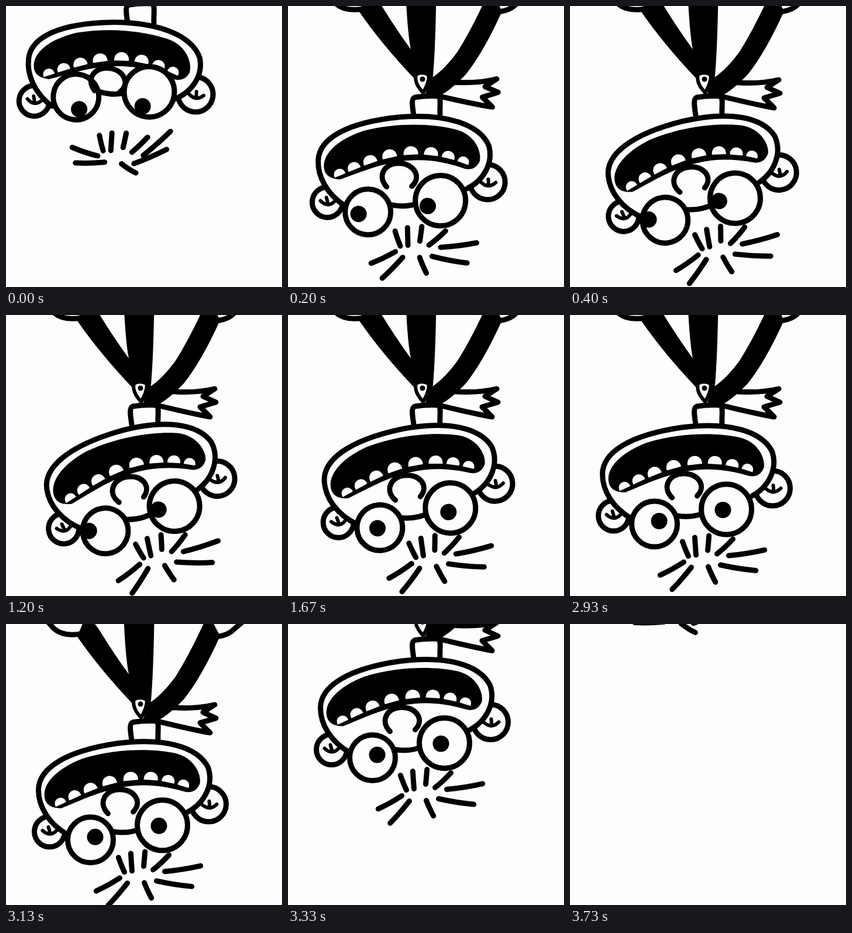
Recreate the animation shown at these times as an HTML page. Size 472 px wide and 480 px high, loop 3.79 s.

```html
<!DOCTYPE html>
<html lang="en">
<head>
<meta charset="utf-8">
<title>Upside-down peek</title>
<style>
html, body { margin: 0; width: 100%; height: 100%; overflow: hidden; background: #fdfdfd; }
svg { display: block; width: 100%; height: 100%; }
.line { fill: none; stroke: #000; stroke-width: 9; stroke-linecap: round; stroke-linejoin: round; }
.skin { fill: #fdfdfd; }
.thin { stroke-width: 6; }
</style>
</head>
<body>
<svg viewBox="0 0 472 480">
  <g id="figure">
    <path class="line skin" d="M64 -24L82 -4Q98 10 128 5L150 -30"/>
    <path class="line skin" d="M340 -30L361 10Q381 7 390 -3L412 -22"/>
    <path id="scarf" class="line skin" d="M246 125C275 132 320 135 357 126L337 139L359 149L332 157L349 174C320 169 295 163 262 155"/>
    <path d="M122 10L138 -30L158 -4Q185 40 210 74Q203 40 200 -60H254Q253 60 248 119L234 150L216 124Q160 65 122 10Z"/>
    <path d="M334 -4L346 -30L366 9Q335 78 304 117Q280 142 262 152L234 154Q238 136 247 122Q268 108 290 78Q312 43 334 -4Z"/>
    <path class="line skin thin" d="M219 117Q230 111 241 118Q241 132 231 148Q215 131 219 117Z"/>
    <circle cx="230" cy="125" r="4.5"/>
    <path class="line skin" d="M215 187C213 173 210 158 217 156Q236 153 256 154C263 155 259 173 260 187"/>
    <g id="head">
      <circle class="line skin" cx="73" cy="343" r="26"/>
      <path class="line thin" d="M61 341Q74 353 85 341M71 335L74 345"/>
      <circle class="line skin" cx="345" cy="296" r="30"/>
      <path class="line thin" d="M334 297Q347 308 359 296M346 291L347 302"/>
      <path class="line skin" d="M104 348C72 330 54 300 54 272C54 235 100 205 190 192C270 182 326 198 344 233C354 262 339 293 310 309"/>
      <path d="M65 287C59 262 85 235 130 218C190 200 250 201 288 209C322 217 333 247 330 261Q323 278 305 275C212 246 152 279 93 303Q69 303 65 287Z"/>
      <path id="lip" fill="none" d="M91 297C150 270 210 236 303 266"/>
      <g id="teeth" class="skin"></g>
      <g id="hair" class="line"></g>
      <g id="glasses">
        <path class="line" d="M182 343Q208 347 228 338"/>
        <circle class="line skin" cx="143" cy="357" r="39"/>
        <circle class="line skin" cx="266" cy="332" r="43"/>
        <circle id="pupilL" cx="143" cy="357" r="14"/>
        <circle id="pupilR" cx="266" cy="332" r="14"/>
      </g>
      <path class="line" d="M173 312C154 293 170 270 193 271C217 270 233 292 216 309"/>
    </g>
  </g>
</svg>
<script>
const LOOP = 3790, STEP = 200 / 3, TEETH = 8;
const el = id => document.getElementById(id);
const move = (id, value) => el(id).setAttribute("transform", value);
const add = parent =>
  el(parent).appendChild(document.createElementNS("http://www.w3.org/2000/svg", "path"));
const clamp = k => Math.min(1, Math.max(0, k));
const part = (t, from, to) => clamp((t - from) / (to - from));
const mix = (a, b, k) => a + (b - a) * k;
const sine = k => (1 - Math.cos(Math.PI * k)) / 2;
const cubic = k => k < .5 ? 4 * k ** 3 : 1 - 4 * (1 - k) ** 3;

// Teeth follow the lip, largest in the middle.
const lip = el("lip"), gap = lip.getTotalLength() / (TEETH - 1);
for (let i = 0; i < TEETH; i++) {
  const at = i * gap + 5 * Math.sin(i - 3.5);
  const p = lip.getPointAtLength(at);
  const a = lip.getPointAtLength(at - 4), b = lip.getPointAtLength(at + 4);
  const turn = Math.atan2(b.y - a.y, b.x - a.x) * 180 / Math.PI;
  const size = .9 + .25 * Math.sin(Math.PI * i / (TEETH - 1));
  const tooth = add("teeth");
  tooth.setAttribute("d", "M-11 0C-12 -17 12 -17 11 0Z");
  tooth.setAttribute("transform", `translate(${p.x} ${p.y}) rotate(${turn}) scale(${size})`);
}

// Root x, y, lean from upright in degrees, length
const hairs = [
  [193, 422, -119, 46], [206, 431, -139, 50], [201, 412, -22, 27],
  [214, 410, -4, 30], [234, 402, 5, 25], [250, 408, 47, 37],
  [270, 411, 81, 62], [256, 427, 99, 61], [235, 430, 155, 29]
].map(h => ({ h, path: add("hair") }));

// The drop lifts the hairs that hang lowest.
function drawHair(fling) {
  for (const { h: [x, y, lean, size], path } of hairs) {
    const lift = 40 * fling * clamp(Math.abs(lean) / 80) ** 3;
    const a = (lean - Math.sign(lean) * lift) * Math.PI / 180;
    const dx = size * Math.sin(a), dy = -size * Math.cos(a);
    path.setAttribute("d", `M${x} ${y}q${dx / 2} ${dy / 2 + 2} ${dx} ${dy}`);
  }
}

// Gaze: x, y and how far the eyes cross
const DOWN = [0, 23, 8], LEFT = [-28, -1, 0], RIGHT = [25, -1, 0],
      AHEAD = [13, 7, 0], CROSSED = [1, -2, 7];
const looks = [
  [0, DOWN], [330, LEFT], [560, LEFT], [800, RIGHT], [1070, LEFT], [1250, LEFT],
  [2000, AHEAD], [2160, AHEAD], [2420, LEFT], [2670, CROSSED]
];

function gaze(t) {
  const next = looks.findIndex(([at]) => at > t);
  if (next < 0) return CROSSED;
  if (next === 0) return DOWN;
  const [t0, a] = looks[next - 1], [t1, b] = looks[next];
  return a.map((v, i) => mix(v, b[i], sine(part(t, t0, t1))));
}

function draw(t) {
  const drop = Math.max(0, 1 - t / 200);
  const dip = 12 * sine(part(t, 2940, 3150));
  const exit = 140 * (Math.max(0, t - 3150) / 183) ** 2;
  const tilt = mix(7.5, -8.2, sine(part(t, 0, 533))) + 8.2 * cubic(part(t, 1130, 2200));
  const fling = 1 - sine(part(t, 0, 220));
  const [x, y, cross] = gaze(t);

  move("figure", `translate(${-7 * drop ** 3} ${dip - exit - 158 * drop ** 4})`);
  move("scarf", `rotate(${-38 * fling} 246 130)`);
  move("head", `translate(1.5 0) rotate(${tilt} 238 185)`);
  move("glasses", `translate(0 ${-30 * fling})`);
  move("pupilL", `translate(${x + cross} ${y - 3})`);
  move("pupilR", `translate(${x - cross} ${y + 3})`);
  drawHair(fling);
}

// Drawn at fifteen poses a second; the last pose already opens the next drop.
function tick() {
  const t = Math.floor((performance.now() % LOOP + 4) / STEP) * STEP;
  draw(t > 3700 ? t - LOOP : t);
  requestAnimationFrame(tick);
}
tick();
</script>
</body>
</html>
```
